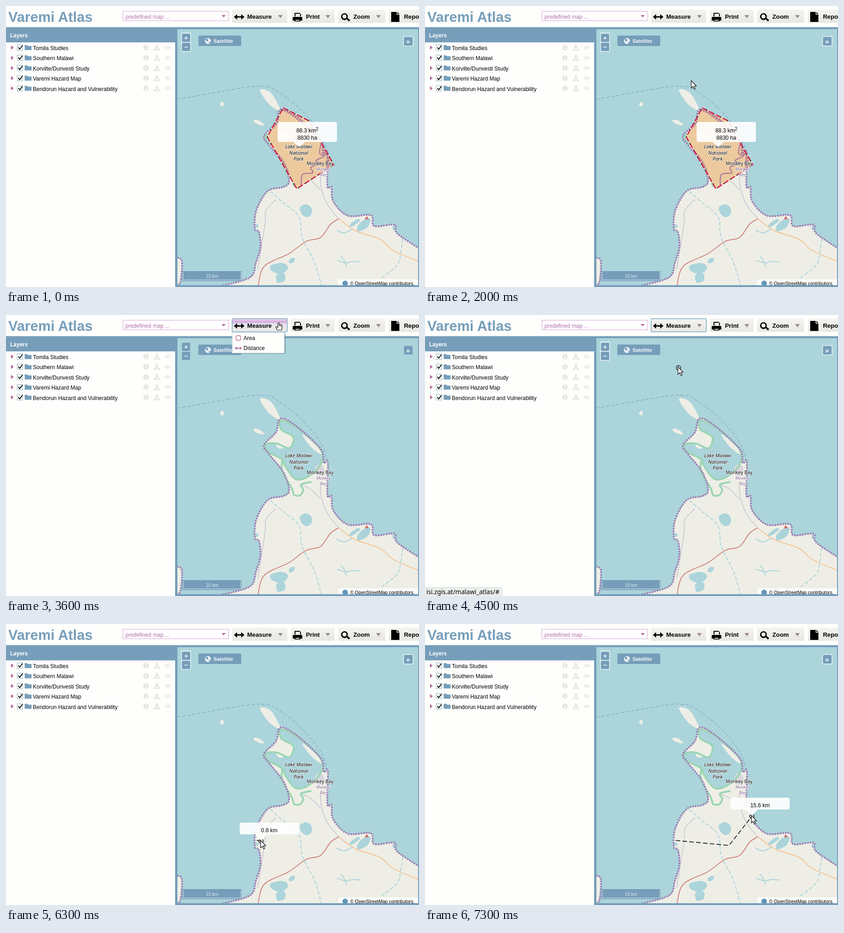
An HTML page for the animation above (8000 ms loop, 906 px wide and 618 px high).

```html
<!DOCTYPE html>
<html lang="en">
<head>
<meta charset="utf-8">
<title>Map measuring</title>
<style>
html, body { margin: 0; width: 100%; height: 100%; overflow: hidden; background: #fefefc; }
svg { display: block; width: 906px; height: 618px; font: 12px "Liberation Sans", Arial, sans-serif; }
.bold { font-weight: bold; }
.mid { text-anchor: middle; }
.place { font-family: "Noto Sans", sans-serif; text-anchor: middle; stroke: #fff; stroke-opacity: .75; stroke-width: 2; paint-order: stroke; stroke-linejoin: round; }
.line { fill: none; stroke-linejoin: round; }
</style>
</head>
<body>
<svg viewBox="0 0 906 618">
  <defs>
    <linearGradient id="face" x2="0" y2="1"><stop stop-color="#f4f4f0"/><stop offset="1" stop-color="#e7e7e2"/></linearGradient>
    <linearGradient id="hot" x2="0" y2="1"><stop stop-color="#ecdcf0"/><stop offset=".25" stop-color="#d2a9dc"/><stop offset=".4" stop-color="#e6e2ec"/><stop offset="1" stop-color="#ecece8"/></linearGradient>
    <clipPath id="mapClip"><path d="M376 51H904V614H376z"/></clipPath>
  </defs>

  <path d="M0 46.500H906V618H371V80H0z" fill="#769eba"/>
  <g id="map" clip-path="url(#mapClip)"></g>
  <g id="area"></g>

  <g class="place" font-size="10.800" font-style="italic"><text x="642" y="313">Lake Malawi</text><text x="642" y="327">National</text><text x="642" y="340">Park</text></g>
  <text class="place" x="689" y="350" font-size="10.300">Monkey Bay</text>
  <g class="place" font-size="9" font-style="italic" fill="#82648f"><text x="696" y="362">Monkey</text><text x="696" y="374">Bay</text></g>

  <g id="halo" fill="#fff" fill-opacity=".5"><rect x="384" y="58" width="22" height="43" rx="3"/><rect x="871" y="66" width="23" height="23" rx="3"/></g>
  <g fill="#769eba">
    <rect x="386" y="61" width="18" height="18" rx="2"/>
    <rect x="386" y="81" width="18" height="18" rx="2"/>
    <rect x="873" y="68" width="19" height="19" rx="2"/>
    <rect x="422" y="65" width="94" height="23" rx="2"/>
    <rect x="386" y="583" width="131" height="22" rx="2"/>
  </g>
  <path d="M391.500 70.500H398.500M395 67V74M391.500 90.500H398.500" stroke="#fff" stroke-width="1.500"/>
  <text class="bold mid" x="882" y="83" font-size="15" fill="#fff">»</text>
  <circle cx="443" cy="77" r="6.500" fill="#f4f8fa"/>
  <path d="M438 73 443 72 444 76 440 79zM444 80 448 77 447 82z" fill="#769eba"/>
  <text class="bold" x="455" y="81" font-size="11.300" fill="#f4f8fa">Satellite</text>
  <path class="line" d="M388.500 585V602.500H515.500V585" stroke="#dfe9ee"/>
  <text class="mid" x="452" y="598" font-size="10" fill="#dfe9ee">10 km</text>
  <g clip-path="url(#mapClip)">
    <rect x="729" y="601" width="180" height="20" rx="3" fill="#fff" fill-opacity=".75"/>
    <circle cx="744" cy="610" r="6" fill="#5f96b8"/>
    <text x="755" y="613.500" font-size="10.200">© OpenStreetMap contributors.</text>
  </g>

  <text class="bold" x="5" y="34.500" font-size="31" fill="#769eba">Varemi Atlas</text>
  <rect x="256.500" y="11.500" width="232" height="21" fill="#fff" stroke="#d3a5d9"/>
  <text x="262" y="28" fill="#b070a6">predefined map ...</text>
  <path d="M473 20H482L477.500 25z" fill="#b56a92"/>
  <g id="toolbar"></g>

  <rect y="80" width="371" height="538" fill="#fefefc"/>
  <text class="bold" x="9" y="69" fill="#fff">Layers</text>
  <g id="layers"></g>

  <g id="menu">
    <path d="M500 84H612V40" class="line" stroke="#5f8199" stroke-width="2.500" stroke-opacity=".6"/>
    <rect x="496.500" y="38.500" width="114" height="45" fill="#fefefc" stroke="#dcdcda"/>
    <rect x="504.500" y="45.500" width="10" height="10" rx="2" fill="none" stroke="#b56a92" stroke-width="1.300"/>
    <path d="M502 73 506 69V72H513V69L517 73 513 77V74H506V77z" fill="#b070a6"/>
    <text x="521" y="55">Area</text><text x="521" y="77">Distance</text>
  </g>
  <g id="status">
    <path d="M-1 599.500H168.500V619H-1z" fill="#ebefea" stroke="#c2d3d6"/>
    <text x="3" y="614" font-size="13.700" style="font-family:'Noto Sans',sans-serif">isi.zgis.at/malawi_atlas/#</text>
  </g>

  <polyline id="route" class="line" stroke="#111" stroke-width="1.700" stroke-dasharray="10 5"/>
  <circle id="ring" r="4.800" fill="#fff" fill-opacity=".2" stroke="#111" stroke-width="1.400"/>
  <g id="tip">
    <path id="bubble" fill="#fff" fill-opacity=".9"/>
    <text class="mid" id="tipTop" x="18"></text><text class="mid" id="tipLow" x="18" y="-17">8830 ha</text>
  </g>
  <path id="arrow" d="M0 0V16.500L3.800 13 6.500 19 9 18 6.400 12H11.300z" fill="#fff" stroke="#111" stroke-width="1.200"/>
  <path id="hand" d="M-1.500 1Q0-1 1.500 1V6L7 7Q8.500 8 8 10L6.500 16H-3L-6 10Q-6 8-3.500 9L-1.500 10.500z" fill="#fff" stroke="#111" stroke-width="1.200"/>
</svg>
<script>
const WATER = "#abd4db", LAND = "#eeeee6", GREEN = "#9ad6b2", BLUE = "#769eba", MAUVE = "#b27c99";
const $ = id => document.getElementById(id);
const fill = (d, color) => `<path d="${d}" fill="${color}"/>`;
const stroke = (d, color, width, dash = "none") =>
  `<path class="line" d="${d}" stroke="${color}" stroke-width="${width}" stroke-dasharray="${dash}"/>`;

// Smooth path through a few key points
function curve(text, closed = false) {
  const points = text.split(" ").map(pair => pair.split(",").map(Number));
  const count = points.length;
  const at = i => closed ? points[(i + count) % count] : points[Math.max(0, Math.min(count - 1, i))];
  const pull = (p, a, b) => p.map((v, i) => (v + (b[i] - a[i]) / 6).toFixed(1));
  let d = "M" + points[0];
  for (let i = 0; i < count - !closed; i++) {
    const from = at(i), to = at(i + 1);
    d += `C${pull(from, at(i - 1), to)} ${pull(to, at(i + 2), from)} ${to}`;
  }
  return d;
}

// Uneven, tilted ellipse for lakes and islets
let seed = 7;
const random = () => (seed = seed * 16807 % 2147483647) / 2147483647;
function blob(x, y, rx, ry, tilt = 0) {
  const points = Array.from({ length: 9 }, (_, i) => {
    const angle = i / 9 * 2 * Math.PI, size = 0.85 + 0.3 * random();
    const u = rx * size * Math.cos(angle), v = ry * size * Math.sin(angle);
    return [x + u * Math.cos(tilt) - v * Math.sin(tilt), y + u * Math.sin(tilt) + v * Math.cos(tilt)];
  });
  return curve(points.join(" "), true);
}

const shore = curve("470,616 535,597 548,565 558,530 555,497 546,490 549,450 574,407 609,398 621,384 608,345 577,306 566,286 592,258 602,228 635,243 690,294 697,325 706,324 705,396 714,398 718,430 750,461 800,460 808,484 852,481 858,500 906,533");
const spit = curve("376,553 386,562 383,605 376,614");
const bay = curve("604,232 640,249 690,296 691,327 668,352 645,362 630,357 612,332 605,317 574,300 570,284 595,283 622,293 630,268 604,252", true);
const track = curve("606,318 606,345 627,381 632,396 646,396 652,384 647,373 670,367");
const paths = curve("692,298 688,324 698,330 680,340 690,346 669,355 673,367 650,371 648,398");

$("map").innerHTML = fill("M376 51H904V614H376z", WATER) +
  fill(shore + "V618H470z", LAND) + fill(spit, LAND) + fill(bay, WATER) +
  fill(curve("650,262 690,294 690,306 668,289", true), LAND) +
  fill(curve("557,185 576,187 591,205 601,230 577,216", true), LAND) +
  fill(blob(474, 216, 4, 5) + blob(554, 256, 13, 4, 0.4) + blob(601, 288, 9, 5, 0.4), LAND) +
  fill(blob(658, 449, 13, 14) + blob(600, 576, 19, 12) + blob(602, 598, 11, 11) + blob(627, 560, 8, 5, -0.6) +
    blob(765, 477, 14, 4, -0.6) + blob(784, 482, 18, 9, -0.7) + blob(550, 484, 4, 4), WATER) +
  stroke(curve("726,559 745,565 760,562 777,563") + curve("735,550 742,560 747,573") + curve("725,493 742,499 761,490"), WATER, 2) +
  stroke(curve("580,408 610,434 643,464 650,510 676,562 692,614") + curve("870,512 866,543 858,570 824,598"), WATER, 2, "8 4") +
  stroke(curve("592,426 570,450 568,480 552,580") + curve("623,292 650,344") + curve("646,373 668,383 690,405") +
    curve("690,370 692,402 706,438 730,468"), "#bcb8ce", 1.2) +
  stroke(curve("553,614 567,572 620,545 658,518 690,509 712,480 730,468"), "#cf7c78", 1.8) +
  stroke(curve("730,468 766,494 820,513 850,538 906,562"), "#f5c493", 2) +
  fill(blob(688, 342, 10, 12), "#d9d5df") +
  stroke(bay + track, GREEN, 4) +
  stroke(curve("376,205 525,179 565,177 590,184 645,226 690,280 705,322"), "#7299c0", 1, "7 4") +
  stroke(shore + spit, "#b3bfd8", 2) + stroke(shore + spit, "#987bae", 4, "3 2.7") +
  fill("M787 469 791.500 462 796 469z", "#d36b6b") +
  stroke("M847 486H856M848 490H855M851 482V493", "#6f9fc4", 1.2);

const field = "M608 224 664 252 719 349 638 402 573 288z";
$("area").innerHTML = `<clipPath id="areaClip"><path d="${field}"/></clipPath>` + fill(field, "#ecca9e") +
  `<g clip-path="url(#areaClip)">` + stroke(shore, MAUVE, 7, "4 1.5") + stroke(paths, MAUVE, 2.5) +
  fill(blob(609, 284, 16, 9), "#f2dfbf") + "</g>" +
  stroke(field, "#f4d5cf", 2) + stroke(field, "#d8123f", 2.4, "11 6") + stroke(field, "#33202c", 2, "0 10 3 4");

// Icons sit in a box whose left edge is the button's left edge
const icons = {
  Measure: "M4 24 11 18V22.500H20V18L27 24 20 30V25.500H11V30z",
  Print: "M8 15H19L22 18V23H20V17H10V23H8zM4 26Q4 24 6 24H23Q25 24 25 26V32H21V29H8V32H4zM8 29H21V34H8zM10 30.500V32.500H19V30.500z",
  Zoom: "M21 23A7.500 7.500 0 1 0 18.500 29L23 34 26 31 20 26zM18 23A4.500 4.500 0 1 1 9 23A4.500 4.500 0 1 1 18 23z",
  Report: "M5 13H17V19H23V35H5zM18.500 13 23 17.500H18.500z"
};
const tool = (name, x, width) => `<g transform="translate(${x})">` +
  `<rect id="btn${name}" y="8" width="${width}" height="29" rx="2" fill="url(#face)"/>` +
  `<path d="${icons[name]}" fill-rule="evenodd"/><text class="bold" x="33" y="28" font-size="13.300">${name}</text>` +
  fill(`M${width - 20} 20h10l-5 7z`, "#9d8792") + "</g>";
$("toolbar").innerHTML = tool("Measure", 496, 121) + tool("Print", 625, 96) + tool("Zoom", 729, 103) + tool("Report", 840, 110);

const layers = ["Tomila Studies", "Southern Malawi", "Korvilte/Dunvesti Study", "Varemi Hazard Map", "Bendorun Hazard and Vulnerability"];
$("layers").innerHTML = layers.map((name, i) => `<g transform="translate(0 ${92 + i * 22.4})">` +
  fill("M11-5 17-.5 11 4z", "#b56a9c") +
  '<rect x="24.500" y="-6.500" width="12" height="12" fill="#fff" stroke="#8fb5bd"/>' +
  stroke("M27-1 30 3 36-5", "#111", 2) +
  fill("M41-6H47L48-4H56V5H41z", BLUE) +
  `<text x="59" y="5">${name}</text><g fill="#e5e5e1"><circle cx="307" cy="-.5" r="6"/>` +
  '<path d="M329-7H333V-2H336L331 3 326-2H329zM324 2H328L331 5 334 2H338V6H324zM348-.5Q355-9 362-.5Q355 8 348-.5z"/></g>' +
  fill("M306-4H308V-2.500H306zM306-1H308V3H306z", "#fff") +
  '<circle cx="355" cy="-.5" r="2.500" fill="#e5e5e1" stroke="#fff" stroke-width="1.500"/></g>').join("");

// Pointer moves: first step, last step, destination
const moves = [
  [500, 600, 475, 97], [900, 1100, 613, 235], [1500, 1700, 594, 128], [1900, 2000, 584, 164],
  [2600, 3300, 598, 17], [3700, 4000, 560, 68], [4200, 4500, 555, 114], [4600, 5000, 608, 419],
  [5100, 5400, 536, 473], [5600, 5800, 545, 483], [6000, 6100, 550, 475], [6300, 6800, 666, 485],
  [6900, 7300, 716, 421]
];
const STEP = 100, LOOP = 8000, KM_PER_PX = 0.0786;
const start = [550, 476], corner = [667, 487];
const ease = p => p * p * (3 - 2 * p);
const show = (id, on) => $(id).setAttribute("visibility", on ? "visible" : "hidden");
const move = (id, x, y) => $(id).setAttribute("transform", `translate(${x} ${y})`);
const dist = (a, b) => Math.hypot(a[0] - b[0], a[1] - b[1]);

function pointerAt(t) {
  let x = 380, y = 20;
  for (const [from, to, endX, endY] of moves) {
    if (t < from) break;
    const p = ease(Math.min(1, (t - from + STEP) / (to - from + STEP)));
    x += (endX - x) * p;
    y += (endY - y) * p;
  }
  return [x, y];
}

const bubble = (top, bottom) =>
  `M-42 ${top}H78q5 0 5 5V${bottom - 5}q0 5-5 5H13L0-1-13 ${bottom}H-42q-5 0-5-5V${top + 5}q0-5 5-5z`;

function drawTip(area, at, points) {
  move("tip", ...(area ? [643, 311] : at));
  $("bubble").setAttribute("d", area ? bubble(-56, -12) : bubble(-41, -15));
  $("tipTop").setAttribute("y", area ? -33 : -20);
  const length = points.slice(1).reduce((sum, p, i) => sum + dist(points[i], p), 0);
  $("tipTop").innerHTML = area
    ? '88.3 km<tspan dy="-4" font-size="10">2</tspan>'
    : (length * KM_PER_PX).toFixed(1) + " km";
}

function draw(time) {
  const t = Math.floor(time % LOOP / STEP) * STEP;
  const [x, y] = pointerAt(t);
  const tip = [x + 1, y + 2];
  const menuOpen = t >= 3600 && t < 4200;
  const overButton = t >= 500 && y < 38 && x > 496;
  const active = t >= 3600 && t < 6300;
  const area = t < 2300, route = t >= 6300;

  show("area", area);
  show("menu", menuOpen);
  show("status", t >= 4200 && t < 5000);
  show("halo", t < 3100 || t >= 4300);
  show("arrow", t >= 500 && !overButton && !menuOpen);
  show("hand", overButton || menuOpen);
  move("arrow", x, y);
  move("hand", x, y);

  const button = $("btnMeasure");
  button.setAttribute("fill", overButton ? "url(#hot)" : "url(#face)");
  button.setAttribute("stroke", active ? "#79abc6" : "none");
  button.setAttribute("stroke-width", 1.5);

  show("ring", t >= 4300);
  move("ring", ...tip);
  const points = t > 6800 ? [start, corner, tip] : [start, tip];
  show("route", route);
  $("route").setAttribute("points", points.join(" "));

  show("tip", area || route);
  show("tipLow", area);
  drawTip(area, tip, points);
}

const origin = performance.now();
function frame() {
  draw(performance.now() - origin);
  requestAnimationFrame(frame);
}
frame();
</script>
</body>
</html>
```
